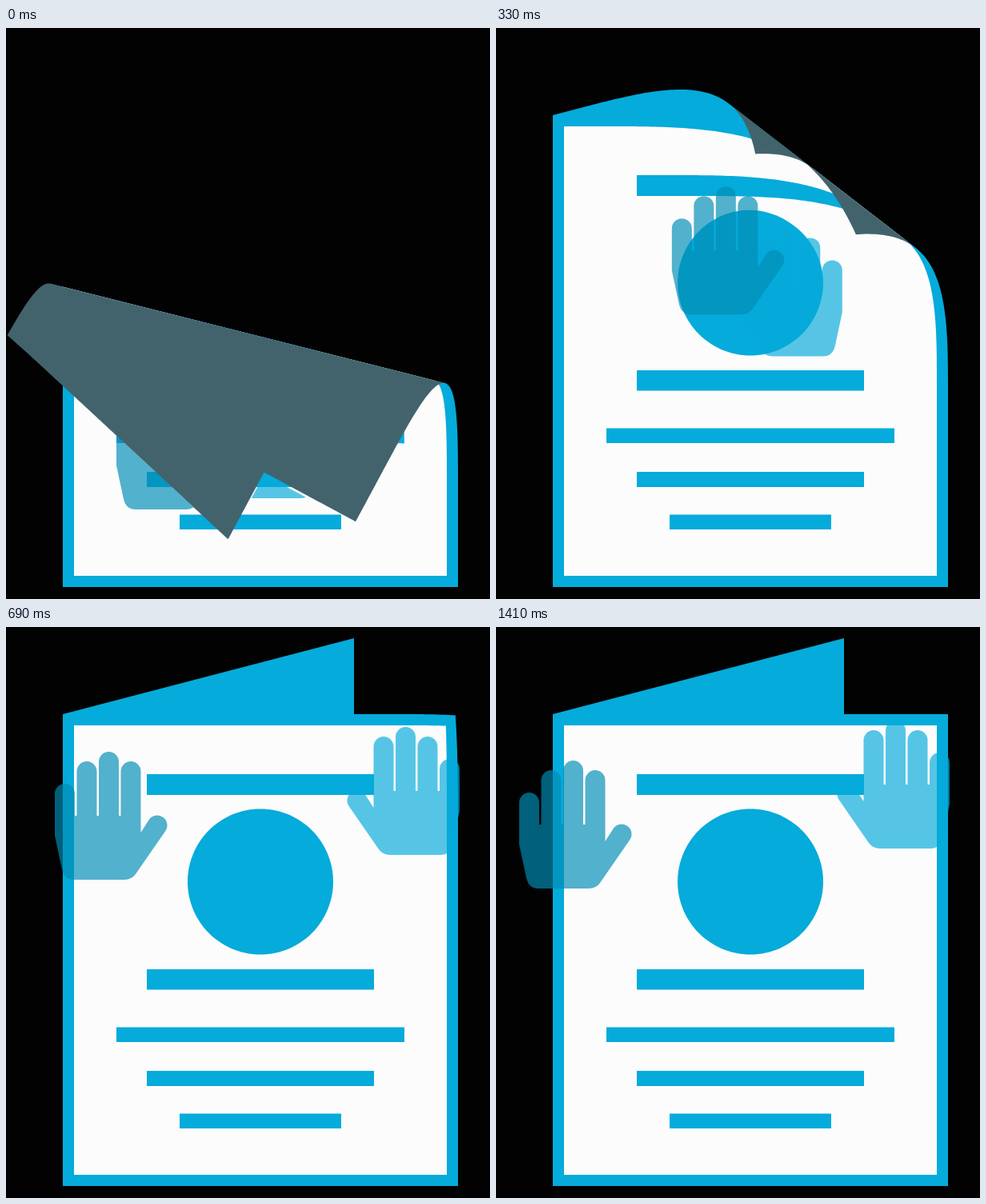
Recreate the animation shown at these times as an HTML page with a canvas. Size 605x714 px, loop 3.63 s.

```html
<!DOCTYPE html>
<html lang="en">
<head>
<meta charset="utf-8">
<title>Unfolding card</title>
<style>
  html, body { margin: 0; width: 100%; height: 100%; overflow: hidden; background: #020202; }
  canvas { display: block; }
</style>
</head>
<body>
<canvas id="stage" width="605" height="714"></canvas>
<script>
const ctx = document.getElementById('stage').getContext('2d');

const LOOP = 3630, STEP = 30, MOVE_END = 1410, FLAP_END = 420;
const BLUE = '#05abda', WHITE = '#fcfcfc', BACK = '#43636c';
const LEFT_HAND = 'rgba(0,142,181,.675)', RIGHT_HAND = 'rgba(5,171,218,.67)';
const RADIUS = 117, EDGE = RADIUS * Math.PI / 2;
const CORNER = [565, 109];

// time, curl depth at the corner, curl angle in degrees
const CURL = [
  [0, 445.8, 14.13], [120, 403.7, 16.82], [210, 343.3, 23.67],
  [450, 205.3, 50.5], [690, 66.6, 63], [840, 0, 66]
];
// time, x, y
const LEFT = [
  [0, 138, 442], [120, 167, 381.5], [210, 209, 292], [450, 224, 149],
  [690, 61, 156], [930, 35, 165], [1080, 31, 166.2], [1410, 29, 167]
];
const RIGHT = [
  [0, 392, 428], [120, 398, 395], [210, 406, 341], [450, 471, 178],
  [690, 567, 125], [930, 567, 117]
];

// Monotone cubic interpolation of one column
function track(keys, col, t) {
  const last = keys.length - 1;
  if (t >= keys[last][0]) return keys[last][col];
  let i = 0;
  while (t >= keys[i + 1][0]) i++;
  const secant = k => (keys[k + 1][col] - keys[k][col]) / (keys[k + 1][0] - keys[k][0]);
  const slope = k => {
    if (k === 0) return secant(0);
    if (k === last) return secant(last - 1);
    const a = secant(k - 1), b = secant(k);
    return a * b > 0 ? 2 * a * b / (a + b) : 0;
  };
  const h = keys[i + 1][0] - keys[i][0], u = (t - keys[i][0]) / h;
  const p = keys[i][col], q = keys[i + 1][col];
  const u2 = u * u, u3 = u2 * u;
  return p * (2 * u3 - 3 * u2 + 1) + q * (3 * u2 - 2 * u3) +
    h * (slope(i) * (u3 - 2 * u2 + u) + slope(i + 1) * (u3 - u2));
}

// Split edges into short pieces so that they can bend
function dense(points) {
  const out = [];
  points.forEach(([x, y], i) => {
    const [x2, y2] = points[(i + 1) % points.length];
    const n = Math.max(1, Math.ceil(Math.hypot(x2 - x, y2 - y) / 5));
    for (let k = 0; k < n; k++) out.push([x + (x2 - x) * k / n, y + (y2 - y) * k / n]);
  });
  return out;
}

const box = (l, t, r, b) => dense([[l, t], [r, t], [r, b], [l, b]]);

const card = dense([[71, 109], [435, 14], [435, 109], CORNER, [565, 699], [71, 699]]);
const disc = Array.from({ length: 120 }, (_, i) => {
  const a = i * Math.PI / 60;
  return [318 + 91 * Math.cos(a), 318.5 + 91 * Math.sin(a)];
});
const front = [
  [card, BLUE],
  [box(85, 123, 551, 685), WHITE],
  [box(176, 184, 460, 210), BLUE],
  [disc, BLUE],
  [box(176, 428, 460, 453.5), BLUE],
  [box(138, 500.5, 498, 519), BLUE],
  [box(176, 555, 460, 574), BLUE],
  [box(217, 608.5, 419, 627), BLUE]
];

function makeHand() {
  const p = new Path2D();
  [[0, 40], [27.5, 12], [55, 0], [82.5, 12]].forEach(([x, y]) =>
    p.roundRect(x, y, 25, 90 - y, [12.5, 12.5, 0, 0]));
  p.moveTo(0, 80);
  p.lineTo(107.5, 80);
  p.lineTo(107.5, 101);
  p.lineTo(118, 84.5);
  p.arc(128, 92, 12.5, -2.5, 0.64);
  p.lineTo(101, 153);
  p.quadraticCurveTo(96, 160, 87, 160);
  p.lineTo(24, 160);
  p.quadraticCurveTo(12, 160, 9, 147);
  p.lineTo(0, 105);
  p.closePath();
  return p;
}
const hand = makeHand();

// Page rolled over a cylinder whose axis is perpendicular to the angle
function makeCurl(t) {
  const a = track(CURL, 2, t) * Math.PI / 180;
  const nx = Math.sin(a), ny = -Math.cos(a);
  const start = CORNER[0] * nx + CORNER[1] * ny - track(CURL, 1, t);
  const depth = ([x, y]) => x * nx + y * ny - start;
  const bend = p => {
    const d = depth(p);
    if (d <= 0) return p;
    const to = d < 2 * EDGE ? RADIUS * Math.sin(d / RADIUS) : 2 * EDGE - d;
    return [p[0] + (to - d) * nx, p[1] + (to - d) * ny];
  };
  return { depth, bend };
}

// Keep the part before (side 1) or past (side -1) the crest, then bend it
function curled(points, curl, side) {
  const path = new Path2D();
  let prev = points[points.length - 1];
  let dp = side * (EDGE - curl.depth(prev));
  const add = p => path.lineTo(...curl.bend(p));
  for (const p of points) {
    const d = side * (EDGE - curl.depth(p));
    if ((d >= 0) !== (dp >= 0)) {
      const k = dp / (dp - d);
      add([prev[0] + (p[0] - prev[0]) * k, prev[1] + (p[1] - prev[1]) * k]);
    }
    if (d >= 0) add(p);
    prev = p;
    dp = d;
  }
  path.closePath();
  return path;
}

// The flap hides a hand through a mask that drifts away from it
function hideBehind(flap, dx, dy) {
  const mask = new Path2D();
  mask.rect(0, 0, 605, 714);
  mask.addPath(flap, new DOMMatrix().translate(dx, dy));
  ctx.clip(mask, 'evenodd');
}

function drawHand(keys, t, flip, color, flap, dx, dy) {
  ctx.save();
  if (flap) hideBehind(flap, dx, dy);
  ctx.translate(track(keys, 1, t), track(keys, 2, t));
  ctx.scale(flip, 1);
  ctx.fillStyle = color;
  ctx.fill(hand);
  ctx.restore();
}

function draw(t) {
  const curl = makeCurl(t);
  ctx.fillStyle = '#020202';
  ctx.fillRect(0, 0, 605, 714);
  for (const [shape, color] of front) {
    ctx.fillStyle = color;
    ctx.fill(curled(shape, curl, 1));
  }
  const flap = t < FLAP_END ? curled(card, curl, -1) : null;
  if (flap) {
    ctx.fillStyle = BACK;
    ctx.fill(flap);
  }
  drawHand(RIGHT, t, -1, RIGHT_HAND, flap, 0, 3 + t * 0.04);
  drawHand(LEFT, t, 1, LEFT_HAND, flap, t * 0.045, t * -0.15);
}

const begin = performance.now();
function tick(now) {
  const t = Math.max(0, now - begin) % LOOP;
  draw(Math.min(MOVE_END, Math.floor(t / STEP) * STEP));
  requestAnimationFrame(tick);
}
draw(0);
requestAnimationFrame(tick);
</script>
</body>
</html>
```
